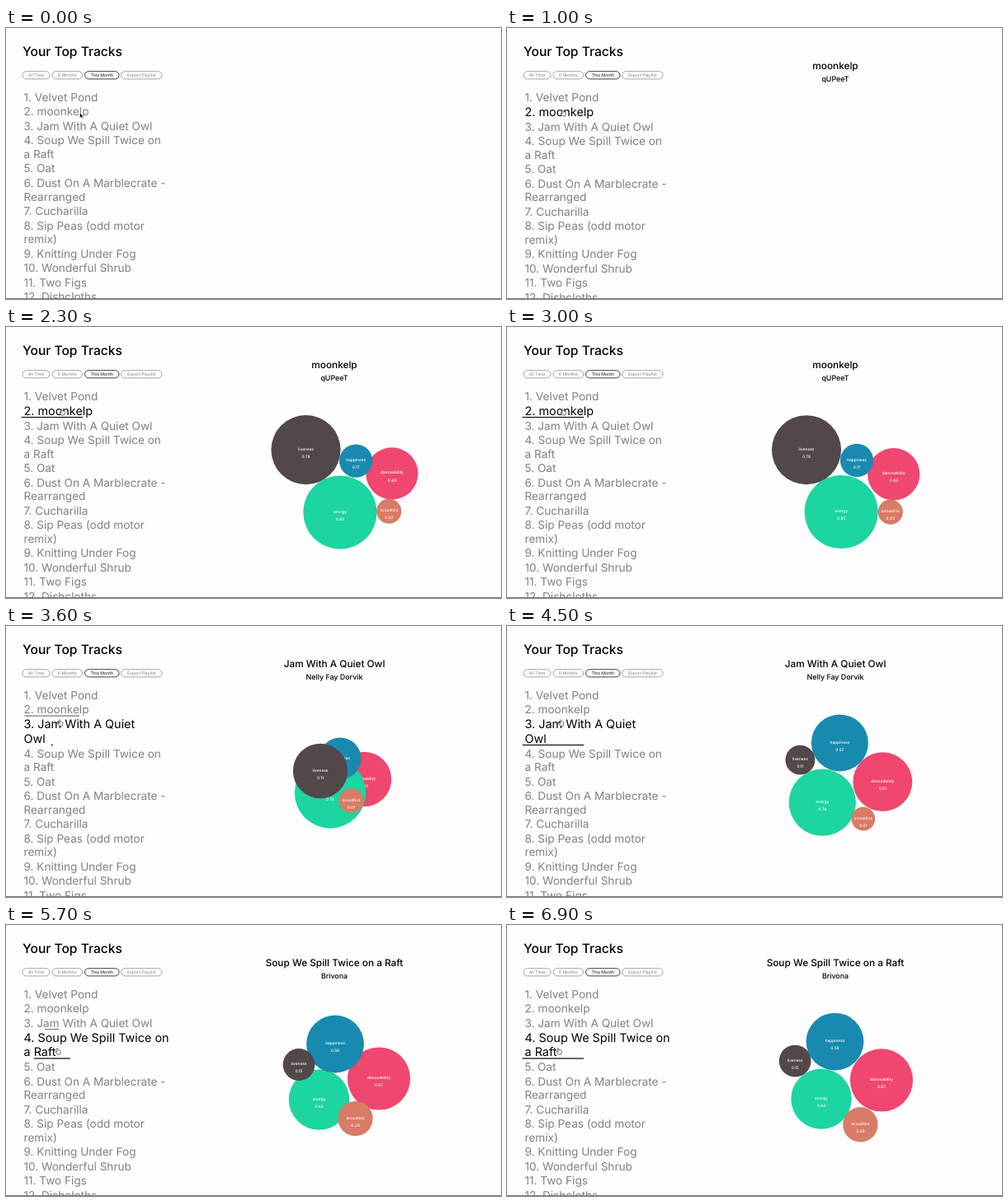
These frames come from a looping animation (600 px wide and 329 px high, 7 s). An HTML page:

```html
<!DOCTYPE html>
<html lang="en">
<head>
<meta charset="utf-8">
<title>Your Top Tracks</title>
<style>
  html, body { margin: 0; width: 100%; height: 100%; overflow: hidden; background: #fdfdfd; }
  svg { display: block; width: 100vw; height: 100vh; }
  text { font-family: Inter, "Open Sans", sans-serif; text-rendering: geometricPrecision; }
  .heading { font-size: 15.6px; font-weight: 500; }
  .pill rect { fill: none; stroke: #8d8d8d; stroke-width: .8; }
  .pill text { font-size: 5.2px; fill: #858585; text-anchor: middle; }
  .pill.on rect { stroke: #111; }
  .pill.on text { fill: #111; }
  .track { font-size: 13.6px; fill: #808080; }
  .track.on { font-size: 14.4px; fill: #000; }
  .title { font-size: 11.8px; font-weight: 500; text-anchor: middle; }
  .artist { font-size: 8.9px; font-weight: 500; text-anchor: middle; }
  .bubble text { font-size: 4.8px; font-weight: 500; fill: #fff; text-anchor: middle; }
</style>
</head>
<body>
<svg viewBox="0 0 600 329">
  <text class="heading" x="20" y="33.7">Your Top Tracks</text>
  <g id="pills"></g>
  <g id="list"></g>
  <g id="chart"></g>
  <g id="pointer"></g>
  <rect y="328" width="600" height="1" fill="#777"/>
</svg>
<script>
const LOOP = 7000, STEP = 100;

const pills = [["All Time", 20, 33], ["6 Months", 56, 36.5], ["This Month", 95.5, 41.5], ["Export Playlist", 139.5, 49.5]];

// Lines of each track; a second array holds the wrapping while selected.
const tracks = [
  [["Velvet Pond"]],
  [["moonkelp"]],
  [["Jam With A Quiet Owl"], ["Jam With A Quiet", "Owl"]],
  [["Soup We Spill Twice on", "a Raft"]],
  [["Oat"]],
  [["Dust On A Marblecrate -", "Rearranged"]],
  [["Cucharilla"]],
  [["Sip Peas (odd motor", "remix)"]],
  [["Knitting Under Fog"]],
  [["Wonderful Shrub"]],
  [["Two Figs"]],
  [["Dishcloths"]]
];

const features = [
  ["danceability", "#ef476f"],
  ["energy", "#1dd5a0"],
  ["happiness", "#188ab0"],
  ["liveness", "#524849"],
  ["acoustics", "#d97b66"]
];

const origin = [[418, 183], [400, 192], [405, 172], [395, 178], [412, 195]];
const cluster = [[434, 186], [393, 202.5], [405, 161], [381, 176], [418.5, 212]];

// Each selection bursts out of the cluster to "near", then drifts to "far".
const selections = [
  { at: 1000, track: 1, title: "moonkelp", artist: "qUPeeT", spread: 300,
    values: [.49, .85, .17, .78, .03],
    near: [[462, 172], [403, 229], [425, 167], [367, 148], [460, 217]],
    far: [[469, 179], [405.3, 224.3], [424, 161.7], [362.8, 149.3], [465, 225]] },
  { at: 3500, track: 2, title: "Jam With A Quiet Owl", artist: "Nelly Fay Dorvik", spread: 200,
    values: [.61, .74, .57, .11, .01],
    near: [[452, 187], [384, 213], [404.5, 145], [360, 168], [428, 231]],
    far: [[456.3, 189.8], [381.8, 214.6], [403, 141], [354, 161], [433, 235]] },
  { at: 5500, track: 3, title: "Soup We Spill Twice on a Raft", artist: "Brivona", spread: 200,
    values: [.67, .63, .58, .15, .20],
    near: [[452, 186.5], [379.5, 212], [399, 144.5], [355, 169.5], [423.5, 235]],
    far: [[454.2, 188.7], [381.2, 211], [397.3, 141.2], [348.4, 164.5], [429, 243.2]] }
];

const pointerPath = [
  [0, 89.5, 103], [100, 85, 102.5], [200, 81, 102.5], [400, 81, 102.5], [500, 80, 102.5], [900, 80, 102.5],
  [1000, 68, 103], [3000, 68, 103], [3300, 67, 107], [3500, 66, 116], [3600, 65.5, 117.5],
  [4700, 65.5, 117.5], [5000, 65, 123], [5400, 63.5, 145], [5500, 63, 153], [LOOP, 63, 153]
];

const $ = id => document.getElementById(id);
const clamp = v => Math.max(0, Math.min(1, v));
const mix = (a, b, p) => a + (b - a) * p;
const mixPoint = (a, b, p) => [mix(a[0], b[0], p), mix(a[1], b[1], p)];
const cubicInOut = p => p < .5 ? 4 * p ** 3 : 1 - 4 * (1 - p) ** 3;
const radius = value => 14 + 36 * value;
const label = (cls, x, y, s) => `<text class="${cls}" x="${x}" y="${y}">${s}</text>`;

// Piecewise-linear lookup in rows of [time, ...values].
function sample(rows, t) {
  let i = 1;
  while (i < rows.length - 1 && rows[i][0] < t) i++;
  const a = rows[i - 1], b = rows[i], p = clamp((t - a[0]) / (b[0] - a[0]));
  return a.slice(1).map((v, k) => mix(v, b[k + 1], p));
}

const lineGrowth = [[0, 0], [100, .03], [200, .59], [300, 1]];
const lineShrink = [[0, 1], [100, .9], [200, .23], [300, 0]];

function underline(y, size, color) {
  const half = 37.2 * size;
  return size ? `<rect x="${55.8 - half}" y="${y - .65}" width="${half * 2}" height="1.3" fill="${color}"/>` : "";
}

function drawList(current, previous, elapsed) {
  let y = 88.9, out = "";
  tracks.forEach(([plain, wrapped], i) => {
    const on = current?.track === i;
    const lines = on && wrapped || plain;
    const height = on ? 17.4 : 16.55;
    const base = y + (on ? .5 : 0);
    lines.forEach((line, n) => {
      out += label(on ? "track on" : "track", 21.5, base + n * height, n ? line : `${i + 1}. ${line}`);
    });
    const lineY = base + (lines.length - 1) * height + 2.7;
    if (on) out += underline(lineY, sample(lineGrowth, elapsed)[0], "#1a1a1a");
    else if (previous?.track === i) out += underline(lineY, sample(lineShrink, elapsed)[0], "#808080");
    y += lines.length * height + .95;
  });
  return out;
}

function bubblePosition(sel, i, elapsed) {
  if (elapsed < 100) return mixPoint(origin[i], cluster[i], elapsed / 100);
  if (elapsed < sel.spread) {
    const p = (elapsed - 100) / (sel.spread - 100);
    return mixPoint(cluster[i], sel.near[i], 1 - (1 - p) ** 2);
  }
  return mixPoint(sel.far[i], sel.near[i], Math.exp((sel.spread - elapsed) / 550));
}

function drawChart(sel, previous, elapsed) {
  if (!sel) return "";
  const grow = cubicInOut(clamp((elapsed + 13) / 250));
  const bubbles = features.map(([name, color], i) => {
    const [x, y] = bubblePosition(sel, i, elapsed);
    const r = mix(previous ? radius(previous.values[i]) : 0, radius(sel.values[i]), grow);
    return `<g class="bubble" transform="translate(${x} ${y})"><circle r="${r}" fill="${color}"/>` +
      label("", 0, .6, name) + label("", 0, 9.8, sel.values[i].toFixed(2)) + "</g>";
  });
  return label("title", 398, 50.3, sel.title) + label("artist", 398, 65, sel.artist) + bubbles.join("");
}

function drawPointer(t) {
  const [x, y] = sample(pointerPath, t);
  const shape = t < 1000
    ? `<path d="M0 0V6L1.4 4.8L2.4 7L3.4 6.5L2.4 4.4H4.2Z" fill="#000" stroke="#fff" stroke-width=".4"/>`
    : `<path d="M-1.6 -3Q-.9 -4 -.3 -3L.3 -1.2Q1 -1.8 1.5 -1Q2.2 -1.4 2.6 -.6Q3.4 -.7 3.4 .3L3 2.4L2.4 4H-.7L-2.9 1Q-2.8 .1 -1.8 .5L-.8 1.2Z" fill="#fff" stroke="#333" stroke-width=".7"/>`;
  return `<g transform="translate(${x} ${y})">${shape}</g>`;
}

$("pills").innerHTML = pills.map(([name, x, w], i) =>
  `<g class="pill${i === 2 ? " on" : ""}"><rect x="${x}" y="52.7" width="${w}" height="9.2" rx="4.6"/>` +
  label("", x + w / 2, 59.2, name) + "</g>").join("");

let shown = -1;
function render(t) {
  const index = selections.findLastIndex(s => s.at <= t);
  const current = selections[index], previous = selections[index - 1];
  const elapsed = current ? t - current.at : 0;
  $("list").innerHTML = drawList(current, previous, elapsed);
  $("chart").innerHTML = drawChart(current, previous, elapsed);
  $("pointer").innerHTML = drawPointer(t);
}

const start = performance.now();
function tick() {
  const t = Math.floor((performance.now() - start) % LOOP / STEP) * STEP;
  if (t !== shown) render(shown = t);
  requestAnimationFrame(tick);
}
tick();
</script>
</body>
</html>
```
